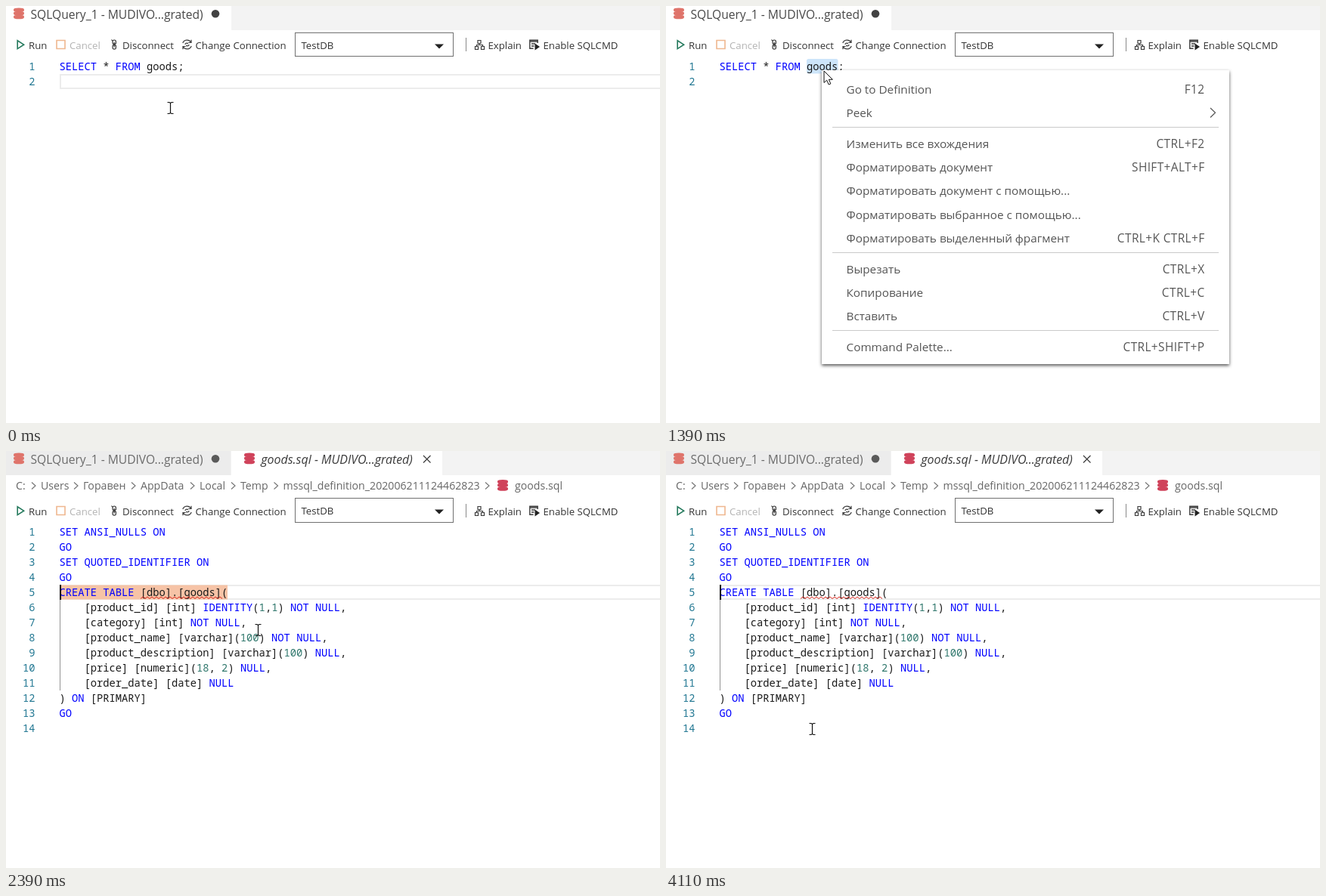
Animation of 865x552 px, one loop 4260 ms. Source, as an HTML page:

```html
<!DOCTYPE html>
<html lang="en">
<head>
<meta charset="utf-8">
<title>Go to Definition</title>
<style>
html, body { margin: 0; width: 100%; height: 100%; overflow: hidden; background: #fff; }
svg { display: block; width: 865px; height: 552px; }
text { font-family: "Open Sans", "Noto Sans", sans-serif; white-space: pre; }
.code { font: 13.75px "Noto Sans Mono", "DejaVu Sans Mono", monospace; fill: #1a1a1a; }
.code .kw { fill: #00f; }
.code .num { fill: #2f776c; }
.no { fill: #237893; text-anchor: end; }
.title { font-size: 15.6px; fill: #484848; }
.tool { font-size: 13.2px; fill: #333; }
.crumb { font-size: 14.15px; fill: #666; }
.item { font-size: 15.3px; fill: #555; }
.key { font-size: 15.4px; letter-spacing: .4px; text-anchor: end; fill: #555; }
.hot .item, .hot .key { fill: #fff; }
.line { fill: none; stroke: #3b3b3b; stroke-width: 1.2; }
</style>
</head>
<body>
<svg id="stage" viewBox="0 0 865 552">
  <defs>
    <filter id="shadow" x="-5%" y="-5%" width="110%" height="110%">
      <feDropShadow dx="0" dy="2" stdDeviation="2" flood-color="#555"/>
    </filter>
  </defs>
</svg>
<script>
const LOOP = 4260;
const NS = "http://www.w3.org/2000/svg";
const stage = document.getElementById("stage");

function add(parent, tag, attrs = {}, text) {
  const el = document.createElementNS(NS, tag);
  for (const k in attrs) el.setAttribute(k, attrs[k]);
  if (text !== undefined) el.textContent = text;
  parent.appendChild(el);
  return el;
}
const group = (p, y = 0) => add(p, "g", { transform: `translate(0 ${y})` });
const rect = (p, x, y, width, height, fill, more) =>
  add(p, "rect", { x, y, width, height, fill, ...more });
const label = (p, cls, x, y, s, more) => add(p, "text", { class: cls, x, y, ...more }, s);
const path = (p, d, more) => add(p, "path", { d, class: "line", ...more });
const show = (el, on) => el.setAttribute("display", on ? "inline" : "none");

function database(p, x, y, fill) {
  for (let i = 0; i < 3; i++)
    add(p, "path", {
      fill,
      d: `M${x} ${y + 2 + i * 4.6}q0 -2 7 -2t7 2v1q0 2.6 -7 2.6t-7 -2.6z`
    });
}

function toolbar(p, shift) {
  const g = group(p, shift);
  path(g, "M15.2 45.8V56.6L23.6 51.2Z", { style: "stroke:#24795c;stroke-width:1.6" });
  label(g, "tool", 30, 57, "Run");
  path(g, "M67 45.5H78V56.5H67Z", { style: "stroke:#efb78f;stroke-width:1.6" });
  label(g, "tool", 84, 57, "Cancel", { style: "fill:#b4b4b4" });
  path(g, "M141 49.5V47.2A2.2 2.2 0 0 1 145.4 47.2V49.5Q143.2 51.5 141 49.5M141 52.5V55A2.2 2.2 0 0 0 145.4 55V52.5Q143.2 50.5 141 52.5M143.2 48V54.5M139.5 44.5L140.6 46");
  label(g, "tool", 154, 57, "Disconnect");
  path(g, "M233.8 49A6 6 0 0 1 244.6 48M245 44.8V48.5H241.4M245.2 53A6 6 0 0 1 234.4 54M234 57.2V53.5H237.6M237 51A1.8 1.8 0 0 1 239.5 49.3H241M242 51A1.8 1.8 0 0 1 239.5 52.7H238");
  label(g, "tool", 250.5, 57, "Change Connection");
  path(g, "M608.5 42V60", { style: "stroke:#8a8a8a;stroke-width:1" });
  path(g, "M624 45.5h4v4h-4zM620.5 53.5h4v4h-4zM628.5 53.5h4v4h-4zM626 49.5V51.5M622.5 53.5V51.5H630.5V53.5");
  label(g, "tool", 637.5, 57, "Explain");
  path(g, "M697.5 56.3H692.8V45.2H703.2V49M692.8 47H703.2M695 50H700M695 53H698.5", { style: "stroke-width:1.4" });
  add(g, "path", { d: "M699.5 49.5V58.5L706 54Z", fill: "#222" });
  label(g, "tool", 710.5, 57, "Enable SQLCMD");

  const box = group(p, shift && shift - 1);
  rect(box, 382.5, 35.5, 209, shift ? 32 : 31, "#fff", { stroke: "#707070" });
  label(box, "tool", 390.5, 57, "TestDB");
  add(box, "path", { d: "M567 50.5H579L573 56.5Z", fill: "#222" });
}

// Bracketed names stay dark, capitals are keywords, digits are numbers.
function code(p, top, lines) {
  lines.forEach((line, i) => {
    const y = top + 15 + i * 20;
    label(p, "code no", 38.5, y, i + 1, { style: "fill:#237893" });
    const t = label(p, "code", 70.5, y);
    for (const part of line.match(/\[\w+\]|[A-Z_]+|\d+|[^A-Z\d[]+|./g) || []) {
      const cls = /^[A-Z]/.test(part) ? "kw" : /^\d/.test(part) ? "num" : "";
      add(t, "tspan", { class: cls }, part);
    }
  });
}

function lineBox(p, y) {
  return rect(p, 72, y + 1, 800, 18, "none", { stroke: "#ececec", "stroke-width": 2 });
}

const TITLE = "MUDIVO...grated)";

function firstTab(p, ink, dot) {
  database(p, 10, 2.5, "#df746b");
  label(p, "title", 32.5, 17, "SQLQuery_1 - " + TITLE, { style: `fill:${ink}` });
  add(p, "circle", { cx: 277, cy: 10.3, r: 5.3, fill: dot });
}

// Query view
const query = group(stage);
rect(query, 298, 0, 567, 32, "#f3f3f3");
firstTab(query, "#484848", "#424242");
toolbar(query, 0);
const lineTwo = lineBox(query, 90);
const lineOne = rect(query, 71, 88, 794, 2, "#ececec");
const pick = rect(query, 186, 70, 41.5, 19.5, "#add6ff", { rx: 2.5 });
code(query, 70, ["SELECT * FROM goods;", ""]);
const caretOne = rect(query, 210.5, 70, 2, 20, "#000");
const progress = rect(query, 0, 30, 18, 2, "#0e70c0");

// Definition view
const def = group(stage);
rect(def, 0, 0, 865, 32, "#f3f3f3");
rect(def, 0, 0, 297, 32, "#ececec");
rect(def, 298, 0, 279, 32, "#fff");
firstTab(def, "#6b6b6b", "#5a5a5a");
database(def, 315, 2.5, "#d0435b");
label(def, "title", 337.5, 17, "goods.sql - " + TITLE, { style: "font-style:italic;font-size:16px;fill:#3c3c3c" });
path(def, "M552 6L561.5 15.5M561.5 6L552 15.5");
[[13, "C:"], [46, "Users"], [102, "Горавен"], [178, "AppData"], [256, "Local"], [310, "Temp"],
 [366.5, "mssql_definition_202006211124462823"], [673, "goods.sql"]].forEach(([x, s], i) => {
  label(def, "crumb", x, 51, s);
  const c = i === 7 ? 634 : x - 12;
  if (i) path(def, `M${c} 41.5L${c + 5} 46L${c} 50.5`, { style: "stroke:#777" });
});
database(def, 650, 38, "#d0435b");
toolbar(def, 28);
lineBox(def, 177);
const flash = rect(def, 71, 177.5, 222, 19, "#f6c3a6");
path(def, "M71.5 197V317", { style: "stroke:#939393;stroke-width:1" });
code(def, 97, [
  "SET ANSI_NULLS ON",
  "GO",
  "SET QUOTED_IDENTIFIER ON",
  "GO",
  "CREATE TABLE [dbo].[goods](",
  "    [product_id] [int] IDENTITY(1,1) NOT NULL,",
  "    [category] [int] NOT NULL,",
  "    [product_name] [varchar](100) NOT NULL,",
  "    [product_description] [varchar](100) NULL,",
  "    [price] [numeric](18, 2) NULL,",
  "    [order_date] [date] NULL",
  ") ON [PRIMARY]",
  "GO",
  ""
]);
path(def, "M178 195.5" + "l3 -2.5l3 2.5".repeat(18), { style: "stroke:#d8261c;stroke-width:1" });
const caretTwo = rect(def, 71, 177, 2, 20, "#000");

// Context menu
const menu = group(stage);
rect(menu, 206, 85, 539, 389, "#fff", { filter: "url(#shadow)" });
const first = group(menu);
const bar = rect(first, 207, 94, 537, 29, "#3062d6");
const row = (p, y, name, key) => {
  label(p, "item", 238.5, y + 5.5, name);
  if (key) label(p, "key", 712.5, y + 5.5, key);
};
row(first, 110.5, "Go to Definition", "F12");
[
  [141.5, "Peek"],
  [182.5, "Изменить все вхождения", "CTRL+F2"],
  [213.5, "Форматировать документ", "SHIFT+ALT+F"],
  [244.8, "Форматировать документ с помощью..."],
  [276.5, "Форматировать выбранное с помощью..."],
  [307.5, "Форматировать выделенный фрагмент", "CTRL+K CTRL+F"],
  [348.5, "Вырезать", "CTRL+X"],
  [379.5, "Копирование", "CTRL+C"],
  [410.5, "Вставить", "CTRL+V"],
  [451.5, "Command Palette...", "CTRL+SHIFT+P"]
].forEach(r => row(menu, ...r));
for (const y of [160, 326, 429]) rect(menu, 220, y, 511, 1, "#cacaca");
path(menu, "M720 135L726.5 141.2L720 147.5", { style: "stroke:#555" });

// Pointer
const beam = path(stage, "M-3.5 -7.5H-1L.5 -6.5L2 -7.5H4.5M-3.5 7.5H-1L.5 6.5L2 7.5H4.5M.5 -7V7", { style: "stroke:#111" });
const arrow = add(stage, "path", {
  d: "M0 0V15.5L3.7 12.2L6.2 18L8.8 16.9L6.4 11.3H11.3Z",
  fill: "#fff", stroke: "#111"
});
const halo = add(stage, "circle", { r: 15, fill: "#dcd700", "fill-opacity": .6 });

const TICKS = [0, 300, 370, 450, 530, 610, 760, 850, 920, 1000, 1150, 1300, 1390, 1470, 1540,
  1620, 1700, 1770, 1850, 1930, 2000, 2080, 2160, 2240, 2320, 2390, 2470, 2640, 2870, 2950,
  3030, 3110, 3180, 3260, 3330, 3410, 3490, 3560, 3640, 3790, 4110];
const MOVES = [[0, 217, 135], [230, 217, 135], [610, 210, 85], [1150, 210, 85], [1390, 209, 86],
  [1770, 250, 108], [2000, 250, 108], [2390, 333, 237], [2800, 333, 237], [2870, 330, 242],
  [3330, 236, 357], [3640, 194, 368], [3790, 193, 368], [LOOP, 193, 368]];
const PRESSES = [[760, 850], [920, 1000], [1150, 1300], [1850, 2000]];
const BLINKS = [[2390, 2640], [3110, 3640], [4110, LOOP]];

function pointerAt(t) {
  const i = MOVES.findIndex(m => m[0] > t);
  const [t0, x0, y0] = MOVES[i - 1], [t1, x1, y1] = MOVES[i];
  const k = (t - t0) / (t1 - t0);
  return [Math.round(x0 + (x1 - x0) * k), Math.round(y0 + (y1 - y0) * k)];
}

function draw(time) {
  const t = TICKS.filter(v => v <= time).pop();
  const within = (a, b) => t >= a && t < b;
  const any = spans => spans.some(([a, b]) => within(a, b));
  const [x, y] = pointerAt(t);

  show(query, t < 2390);
  show(def, t >= 2390);
  show(lineTwo, t < 760);
  show(lineOne, within(760, 920));
  show(caretOne, within(760, 920));
  show(pick, t >= 920);
  pick.setAttribute("fill", t < 1150 ? "#add6ff" : "#cde5fa");
  show(progress, within(2080, 2390));
  progress.setAttribute("x", (t - 2080) * .22);
  show(flash, t < 2870);
  show(caretTwo, any(BLINKS));

  const open = within(1300, 2080);
  const hot = open && y >= 95;
  show(menu, open);
  show(bar, hot);
  first.setAttribute("class", hot ? "hot" : "");

  show(beam, !open);
  show(arrow, open);
  for (const el of [beam, arrow]) el.setAttribute("transform", `translate(${x} ${y})`);
  show(halo, any(PRESSES));
  halo.setAttribute("cx", x - .5);
  halo.setAttribute("cy", y + (open ? 1.5 : -.5));
}

const start = performance.now();
function tick() {
  draw((performance.now() - start) % LOOP);
  requestAnimationFrame(tick);
}
tick();
</script>
</body>
</html>
```
